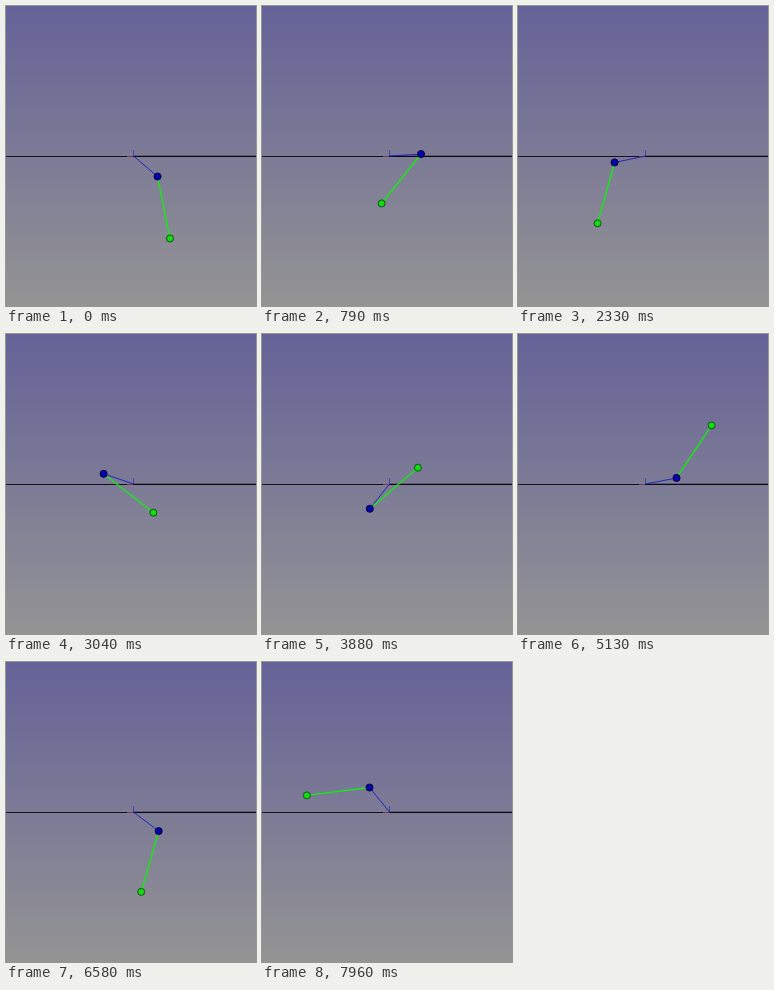
An HTML page for the animation above (8 s loop, 250x300 px).

```html
<!DOCTYPE html>
<html lang="en">
<head>
<meta charset="utf-8">
<title>Double pendulum</title>
<style>
html, body { margin: 0; width: 100%; height: 100%; overflow: hidden; }
body { background: linear-gradient(#656298, #949494); }
svg { display: block; width: 250px; height: 300px; }
circle { stroke-width: .8; }
</style>
</head>
<body>
<svg viewBox="0 0 250 300">
  <defs>
    <radialGradient id="blue"><stop offset=".5" stop-color="#0404b0"/><stop offset="1" stop-color="#020278"/></radialGradient>
    <radialGradient id="green"><stop offset=".5" stop-color="#12e012"/><stop offset="1" stop-color="#0ca80c"/></radialGradient>
  </defs>
  <path d="M0 150.5H121" stroke="#121218"/>
  <path d="M121 150.5H127" stroke="#803848"/>
  <path d="M127 150.4H250" stroke="#08080c" stroke-width="1.4"/>
  <path d="M127.5 144V150" stroke="#4444a4"/>
  <line id="upper" stroke="#2424bc"/>
  <line id="lower" stroke="#14ec14" stroke-width="1.4"/>
  <circle id="bob" r="3.6" fill="url(#blue)" stroke="#04043c"/>
  <circle id="tip" r="3.6" fill="url(#green)" stroke="#184c18"/>
</svg>
<script>
const LOOP = 8000, FRAMES = 192;
const PIVOT = { x: 127.5, y: 150 }, UPPER = 31.6, LOWER = 63.2;

// Key poses: seconds, then upper and lower arm in degrees from straight down
const POSES = [
  [0, 49.5, 11.4], [0.78, 94, -38], [1.3, 38, -66], [1.63, 22.5, -70.1],
  [1.75, 16, -65.5], [2.33, -78.2, -15.6], [2.8, -112, 31], [3.33, -92, 77],
  [3.88, -38.5, 130.5], [4.5, 36, 161], [5.13, 101, 146.3], [5.83, 135.5, 78.6],
  [6.2, 107, 26], [6.58, 52.8, -16], [7, -20, -16], [7.5, -121.5, -39.5],
  [7.96, -140.8, -82.8]
];

function slope(i, k) {
  const at = POSES[i], before = POSES[i - 1], after = POSES[i + 1];
  const rate = (a, b) => (b[k] - a[k]) / (b[0] - a[0]);
  if (!before) return rate(at, after);
  if (!after) return rate(before, at);
  const left = at[0] - before[0], right = after[0] - at[0];
  return (rate(before, at) * right + rate(at, after) * left) / (left + right);
}

// Cubic Hermite through the poses
function angle(t, k) {
  let i = 0;
  while (i < POSES.length - 2 && t > POSES[i + 1][0]) i++;
  const a = POSES[i], b = POSES[i + 1], span = b[0] - a[0];
  const u = (t - a[0]) / span, v = 1 - u;
  const degrees = v * v * (1 + 2 * u) * a[k] + u * u * (1 + 2 * v) * b[k]
    + u * v * span * (v * slope(i, k) - u * slope(i + 1, k));
  return degrees * Math.PI / 180;
}

const swing = (from, length, a) =>
  ({ x: from.x + length * Math.sin(a), y: from.y + length * Math.cos(a) });

function set(id, values) {
  const node = document.getElementById(id);
  for (const name in values) node.setAttribute(name, values[name].toFixed(2));
}
const connect = (id, p, q) => set(id, { x1: p.x, y1: p.y, x2: q.x, y2: q.y });
const place = (id, p) => set(id, { cx: p.x, cy: p.y });

// Frames start on whole hundredths of a second
const frameStart = n => Math.round(n * LOOP / FRAMES / 10) * 10;

function draw(ms) {
  const t = ms % LOOP;
  let n = Math.min(FRAMES - 1, Math.round(t * FRAMES / LOOP));
  if (frameStart(n) > t) n--;
  const time = frameStart(n) / 1000;
  const bob = swing(PIVOT, UPPER, angle(time, 1));
  const tip = swing(bob, LOWER, angle(time, 2));
  connect("upper", PIVOT, bob);
  connect("lower", bob, tip);
  place("bob", bob);
  place("tip", tip);
}

function tick() {
  draw(performance.now());
  requestAnimationFrame(tick);
}
tick();
</script>
</body>
</html>
```
